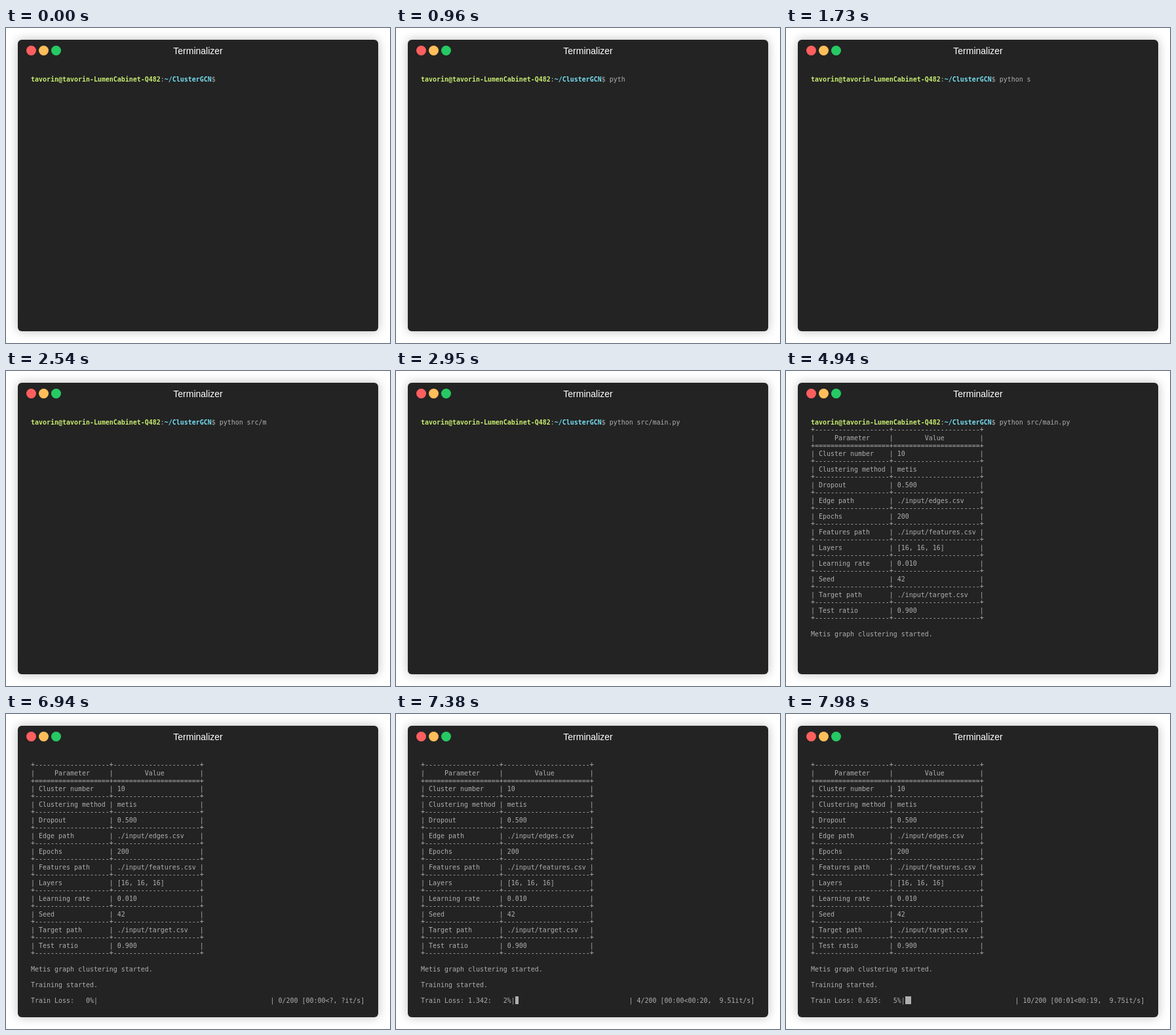
These frames come from a looping animation (586x482 px, 8 s). An HTML page:

```html
<!DOCTYPE html>
<html lang="en">
<head>
<meta charset="utf-8">
<title>Terminalizer</title>
<style>
  html, body { margin: 0; width: 100%; height: 100%; overflow: hidden; background: #fff; }
  #window {
    position: absolute; left: 18px; top: 18px; width: 550px; height: 446px;
    border-radius: 6px; background: #232323; box-shadow: 0 0 15px rgba(0, 0, 0, .26);
  }
  .dot { position: absolute; top: 9px; width: 15px; height: 15px; border-radius: 50%; }
  #title {
    position: absolute; left: 0; top: 9px; width: 100%; text-align: center;
    font: 14px/16px "Liberation Sans", Arial, sans-serif; color: #fff;
  }
  #screen {
    position: absolute; left: 20px; top: 55px; color: #afafaf;
    font: 9.966px/12px "DejaVu Sans Mono", monospace; white-space: pre;
    font-variant-ligatures: none;
  }
  #screen div { height: 12px; }
  #screen #output { height: auto; }
  .rule { position: relative; top: -1px; }
  b.user { color: #c8ed71; }
  b.path { color: #75dff2; }
  #bar { position: absolute; top: 414px; height: 12px; background: #afafaf; }
</style>
</head>
<body>
<div id="window">
  <div class="dot" style="left:13px;background:#ff5f5f"></div>
  <div class="dot" style="left:32px;background:#ffbe5a"></div>
  <div class="dot" style="left:51px;background:#26c963"></div>
  <div id="title">Terminalizer</div>
  <div id="screen"><div id="prompt"><b class="user">tavorin@tavorin-LumenCabinet-Q482</b>:<b class="path">~/ClusterGCN</b>$ <span id="command"></span></div><div id="output"></div></div>
  <div id="bar"></div>
</div>
<script>
const LOOP = 8000, COLS = 85, CELL = 6, BLOCK = 9.2, EPOCHS = 200;
const TABLE_AT = 4200, METIS_AT = 4940, TRAIN_AT = 6940;
const COMMAND = 'python src/main.py';

// [time, number of characters typed]
const TYPING = [[500, 1], [770, 2], [860, 3], [960, 4], [1220, 5], [1460, 6], [1730, 8],
  [1920, 9], [2160, 11], [2540, 12], [2760, 13], [2950, 18]];

const PARAMS = [
  ['Cluster number', '10'],
  ['Clustering method', 'metis'],
  ['Dropout', '0.500'],
  ['Edge path', './input/edges.csv'],
  ['Epochs', '200'],
  ['Features path', './input/features.csv'],
  ['Layers', '[16, 16, 16]'],
  ['Learning rate', '0.010'],
  ['Seed', '42'],
  ['Target path', './input/target.csv'],
  ['Test ratio', '0.900']
];

const $ = id => document.getElementById(id);
const rule = c => `+${c.repeat(19)}+${c.repeat(22)}+`;
const row = (a, b) => `| ${a.padEnd(17)} | ${b.padEnd(20)} |`;
const clock = s => '00:' + String(Math.floor(s)).padStart(2, '0');

const table = [
  rule('-'), row('    Parameter', '       Value'), rule('='),
  ...PARAMS.flatMap(([a, b]) => [row(a, b), rule('-')])
];

function line(text) {
  const div = document.createElement('div');
  div.textContent = text;
  if (text.startsWith('+-')) div.className = 'rule';
  return div;
}

function halfEven(x) {
  const f = Math.floor(x);
  return x - f === 0.5 ? f + f % 2 : Math.round(x);
}

function progress(n) {
  const rate = 9.75 - 0.04 * (10 - n);
  const loss = 1.95 * Math.pow(0.635 / 1.95, (n - 1) / 9);
  const percent = String(halfEven(100 * n / EPOCHS)).padStart(3);
  const left = (n ? `Train Loss: ${loss.toFixed(3)}: ` : 'Train Loss: ') + percent + '%|';
  const stats = n
    ? `${clock(n / rate)}<${clock((EPOCHS - n) / rate)}, ${rate.toFixed(2).padStart(5)}it/s`
    : '00:00<?, ?it/s';
  const right = `| ${n}/${EPOCHS} [${stats}]`;
  const room = COLS - left.length - right.length;
  const eighths = Math.floor(n / EPOCHS * room * 8);
  const full = Math.floor(eighths / 8);
  // Block glyphs are wider than their cell, so a full one spills over.
  const spill = full ? BLOCK - CELL : 0;
  return {
    text: left + ' '.repeat(room) + right,
    x: 20 + left.length * CELL,
    width: full * CELL + Math.max(spill, BLOCK * (eighths % 8) / 8)
  };
}

function epochAt(t) {
  const s = t - TRAIN_AT;
  return s < 120 ? 0 : Math.min(10, 1 + Math.floor((s - 120) / 102));
}

function render(typed, stage, epoch) {
  const lines = stage > 0 ? [...table] : [];
  if (stage > 1) lines.push('', 'Metis graph clustering started.');
  $('bar').style.width = '0';
  if (stage > 2) {
    const p = progress(epoch);
    lines.push('', 'Training started.', '', p.text);
    $('bar').style.left = p.x + 'px';
    $('bar').style.width = p.width + 'px';
  }
  $('command').textContent = COMMAND.slice(0, typed);
  $('prompt').style.display = stage > 2 ? 'none' : 'block';
  $('output').replaceChildren(...lines.map(line));
}

const start = performance.now();
let shown = '';

function tick() {
  const t = (performance.now() - start) % LOOP;
  const typed = TYPING.reduce((n, [at, count]) => t >= at ? count : n, 0);
  const stage = [TABLE_AT, METIS_AT, TRAIN_AT].filter(at => t >= at).length;
  const epoch = epochAt(t);
  const key = [typed, stage, epoch].join();
  if (key !== shown) {
    shown = key;
    render(typed, stage, epoch);
  }
  requestAnimationFrame(tick);
}
tick();
</script>
</body>
</html>
```
